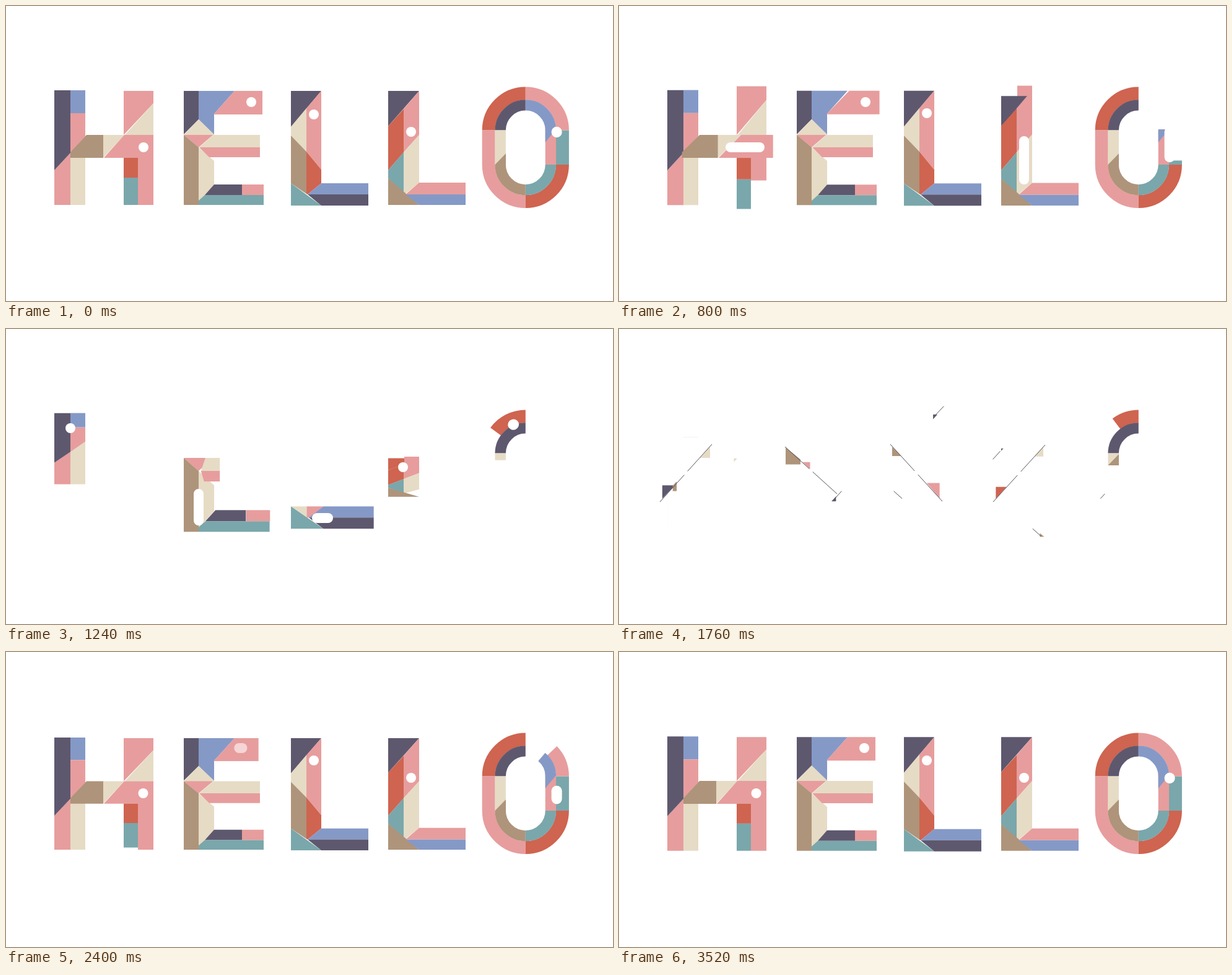
Write an HTML page with a canvas that moves like this. It is 980 by 476 pixels and loops after 3.56 s.

```html
<!DOCTYPE html>
<html lang="en">
<head>
<meta charset="utf-8">
<title>Hello</title>
<style>
html, body { margin: 0; width: 100%; height: 100%; overflow: hidden; background: #fff; }
canvas { display: block; }
</style>
</head>
<body>
<canvas id="stage" width="980" height="476"></canvas>
<script>
const ctx = document.getElementById('stage').getContext('2d');
const LOOP = 3560, SWITCH = 1500;
const C = {
  purple: '#5e586e', blue: '#8599c7', pink: '#e79d9d', cream: '#e6dbc5',
  brown: '#ae947a', red: '#cf6450', teal: '#7aa7ab'
};

const clamp = v => Math.max(0, Math.min(1, v));
const span = (t, a, b) => clamp((t - a) / (b - a));
const easeInOut = p => p < .5 ? 2 * p * p : 1 - 2 * (1 - p) * (1 - p);
const backIn = p => p * p * (2.7 * p - 1.7);

// Interpolates rows of [time, ...values].
function keyed(t, rows) {
  if (t <= rows[0][0]) return rows[0].slice(1);
  for (let i = 1; i < rows.length; i++) {
    const a = rows[i - 1], b = rows[i];
    if (t <= b[0]) {
      const p = span(t, a[0], b[0]);
      return a.slice(1).map((v, j) => v + (b[j + 1] - v) * p);
    }
  }
  return rows[rows.length - 1].slice(1);
}

// enter: "side start end dx dy" - reveal direction, window and starting offset
// leave: "axis value start end" - squash onto a line
function piece(color, shape, enter, leave, since = 0) {
  const points = shape.split(' ').map(p => p.split(',').map(Number));
  const xs = points.map(p => p[0]), ys = points.map(p => p[1]);
  const box = [Math.min(...xs), Math.min(...ys), Math.max(...xs), Math.max(...ys)];
  return { color: C[color], points, box, enter: enter && parse(enter), leave: leave && parse(leave), since };
}
function parse(spec) {
  const [kind, ...n] = spec.split(' ');
  return [kind, ...n.map(Number)];
}

const letters = [
  { leave: parse('y 136 1060 1276'), pieces: [
    piece('pink', '78,265 104,237 104,321 78,321', 'r 1750 2050'),
    piece('cream', '104,237 128,208 128,321 104,321', 'd 1640 2050 23 -24'),
    piece('purple', '78,136 104,136 104,237 78,265', 'u 1640 2050 -10 12'),
    piece('blue', '104,136 128,136 128,173 104,173', 'u 1750 2050'),
    piece('pink', '104,173 128,173 128,210 104,237', 'u 1780 2060'),
    piece('brown', '130,208 157,208 157,245 104,245 104,236', 'r 1660 2060 -20 20', 'x 128 640 1060'),
    piece('cream', '157,208 191,208 157,245', 'l 1640 2060', 'x 128 640 1060'),
    piece('pink', '190,137 238,137 238,157 190,208', 'r 1930 2160', 'y 208 660 980'),
    piece('cream', '238,157 238,208 192,208', 'l 2130 2340', 'y 208 660 980'),
    piece('pink', '191,208 238,208 238,245 158,245', 'r 1860 2100', 'x 128 640 1060'),
    piece('pink', '213,244 238,244 238,321 213,321', 'd 2140 2400', 'y 244 600 828'),
    piece('red', '190,245 213,245 213,277 190,277', 'l 2040 2280', 'y 245 740 940'),
    piece('teal', '190,277 213,277 213,321 190,321', 'd 2200 2450', 'y 245 740 940')
  ] },
  { leave: parse('y 208 1180 1460'), pieces: [
    piece('purple', '287,137 311,137 311,183 287,207', 'u 2160 2400', 'y 208 820 1140'),
    piece('blue', '311,137 369,137 336,174 336,208 311,183', 'u 1980 2240', 'y 208 820 1140'),
    piece('pink', '369,137 414,137 414,175 335,175', 'r 2200 2450', 'x 336 680 1060'),
    piece('cream', '311,183 336,207 311,228 287,208', 'u 1860 2080', 'y 208 860 1160'),
    piece('pink', '287,208 334,208 311,228', 'd 2140 2300'),
    piece('cream', '335,208 410,208 410,228 312,228', 'r 1860 2080', 'x 316 860 1270'),
    piece('brown', '287,208 311,228 311,321 287,321', 'd 1640 1980 -24 -24'),
    piece('cream', '311,228 336,250 336,289 311,316', 'd 1800 2040'),
    piece('pink', '312,228 410,228 410,244 328,244', 'r 1660 2060 -18 -16', 'x 316 860 1270'),
    piece('purple', '336,288 381,288 381,305 321,305', 'r 1660 2060 25 -29', 'x 312 1140 1430'),
    piece('pink', '381,288 416,288 416,305 381,305', 'r 1960 2120', 'x 312 1080 1440'),
    piece('teal', '321,305 416,305 416,321 311,321 311,314', 'r 1960 2220', 'x 311 1060 1430')
  ] },
  { leave: parse('x 460 1160 1460'), pieces: [
    piece('cream', '460,286 485,286 485,304', '', '', 860),
    piece('pink', '484,286 509,286 488,304 484,304', '', '', 860),
    piece('purple', '460,137 509,137 460,195', 'l 1650 2060 6 -2', 'y 286 800 1180'),
    piece('pink', '509,137 509,264 485,235 485,165', 'u 1640 2020 11 13', 'y 286 800 1180'),
    piece('cream', '485,165 485,235 460,209 460,195', 'u 1800 2060', 'y 286 800 1180'),
    piece('brown', '460,209 485,235 485,303 460,286', 'd 1640 2060 -23 -24', 'y 286 800 1180'),
    piece('red', '485,235 509,264 509,286 487,304 485,303', 'l 1920 2160', 'y 286 800 1180'),
    piece('teal', '460,286 509,322 460,322', 'u 1820 2080'),
    piece('blue', '509,286 585,286 585,304 487,304', 'd 2100 2300'),
    piece('purple', '487,304 585,304 585,322 509,322', 'r 1900 2180')
  ] },
  { leave: parse('y 245 760 1282'), pieces: [
    piece('pink', '643,130 667,130 667,165 643,165', '', '', 720),
    piece('red', '617,137 643,137 643,166 617,194', '', '', 960),
    piece('purple', '617,137 667,137 617,194', 'u 1690 2060 0 2', 'y 194 600 870'),
    piece('red', '643,165 643,235 617,265 617,194', 'u 1640 2020 -11 13'),
    piece('pink', '667,137 667,208 642,236 642,166', 'u 1800 2060'),
    piece('cream', '667,208 667,285 645,303 642,302 642,236', 'd 1640 2050 22 -23'),
    piece('teal', '617,265 642,236 642,302 617,278', 'r 2080 2260'),
    piece('brown', '617,278 667,321 617,321', 'l 1650 2060 23 20'),
    piece('pink', '667,285 742,285 742,304 645,304', 'r 1960 2260', 'x 642 800 1140'),
    piece('blue', '645,304 742,304 742,321 667,321', 'r 2160 2400', 'x 642 800 1140')
  ] }
];

function squash(points, spec, t) {
  if (!spec) return points;
  const [axis, value, a, b] = spec;
  const k = 1 - backIn(span(t, a, b));
  return points.map(([x, y]) => axis === 'x' ? [value + (x - value) * k, y] : [x, value + (y - value) * k]);
}

function fillPoly(points, color) {
  ctx.beginPath();
  points.forEach(([x, y]) => ctx.lineTo(x, y));
  ctx.closePath();
  ctx.fillStyle = color;
  ctx.fill();
}

function drawPiece(p, letter, t) {
  if (t < SWITCH) {
    if (t >= p.since) fillPoly(squash(squash(p.points, p.leave, t), letter.leave, t), p.color);
    return;
  }
  if (!p.enter) return;
  const [side, a, b, dx = 0, dy = 0] = p.enter;
  const e = easeInOut(span(t, a, b));
  if (e === 0) return;
  ctx.save();
  ctx.translate(dx * (1 - e), dy * (1 - e));
  if (e < 1) {
    const [x0, y0, x1, y1] = p.box, w = x1 - x0, h = y1 - y0;
    ctx.beginPath();
    if (side === 'r') ctx.rect(x0, y0, w * e, h);
    if (side === 'l') ctx.rect(x1 - w * e, y0, w * e, h);
    if (side === 'd') ctx.rect(x0, y0, w, h * e);
    if (side === 'u') ctx.rect(x0, y1 - h * e, w, h * e);
    ctx.clip();
  }
  fillPoly(p.points, p.color);
  ctx.restore();
}

// The O is a track of six sections, counted counterclockwise from the top.
const OX = 838.8, TOP = 200.5, BOTTOM = 256, Q = Math.PI / 2;

function track(r, from, to, width, color, cap = 'butt') {
  if (to <= from) return;
  ctx.beginPath();
  for (let k = Math.floor(from); k < to && k < 6; k++) {
    const a = Math.max(0, from - k), b = Math.min(1, to - k);
    if (k === 1 || k === 4) {
      const x = OX + (k === 1 ? -r : r);
      const y = s => k === 1 ? TOP + (BOTTOM - TOP) * s : BOTTOM - (BOTTOM - TOP) * s;
      ctx.lineTo(x, y(a));
      ctx.lineTo(x, y(b));
    } else {
      const start = [-1, 0, 2, 1, 0, 0][k] * Q;
      ctx.arc(OX, k === 2 || k === 3 ? BOTTOM : TOP, r, start - a * Q, start - b * Q, true);
    }
  }
  ctx.lineWidth = width;
  ctx.lineCap = cap;
  ctx.strokeStyle = color;
  ctx.stroke();
}

const outerColors = ['red', 'pink', 'pink', 'red', 'teal', 'pink'];
const innerColors = ['purple', 'cream', 'brown', 'teal', 'pink', 'blue'];

function drawO(t) {
  const leaving = t < SWITCH;
  const [outer, inner] = leaving
    ? keyed(t, [[620, 6, 6], [780, 4.3, 5.1], [800, 4.12, 5], [1240, .6, 1.2], [1390, 0, 0]])
    : keyed(t, [[1640, 0, 0], [1760, .41, 1.35], [2120, 3.69, 4], [2480, 6, 6]]);
  for (let k = 0; k < 6; k++) {
    track(59.6, k, Math.min(k + 1, outer), 21, C[outerColors[k]]);
    track(40.6, k, Math.min(k + 1, inner), 17.4, C[innerColors[k]]);
  }
  if (inner > 1.32) {
    const y = TOP + (BOTTOM - TOP) * Math.min(1, inner - 1);
    fillPoly([[789.5, y], [807, y - 18], [807, y]], C.brown);
  }
  if (inner >= 5) fillPoly([[870.7, 199], [888, 199], [870.7, 220]], C.blue);

  if (leaving) {
    const [a, b] = keyed(t, [[620, 4.94, 4.95], [800, 4.22, 4.95], [1000, 2.2, 3], [1240, .25, .26], [1380, 0, .01]]);
    track(50.3, a, b, 17, '#fff', 'round');
  } else if (t > 2040) {
    const [a, b, alpha] = keyed(t, [[2040, 1.9, 1.95, 0], [2120, 2.52, 2.65, .6], [2300, 3.6, 4.1, 1], [2480, 4.94, 4.95, 1]]);
    ctx.globalAlpha = alpha;
    track(50.3, a, b, 17, '#fff', 'round');
    ctx.globalAlpha = 1;
  }
}

// Eyes: rows are [time, x1, y1, x2, y2] and, when entering, opacity.
const eyes = [
  {
    leave: [[640, 222, 228, 222, 228], [800, 180, 228, 227, 228], [940, 104, 228, 140, 228], [1060, 104, 190, 104, 215], [1240, 104, 160, 104, 160]],
    enter: [[2040, 163, 228, 165, 228, 0], [2120, 179, 228, 206, 228, .65], [2240, 221.5, 228, 221.5, 228, 1]]
  }, {
    leave: [[640, 396, 155, 396, 155], [800, 398, 155, 398, 155], [980, 322, 155, 360, 155], [1100, 311, 190, 311, 215], [1240, 311, 266, 311, 309], [1380, 330, 313, 360, 313]],
    enter: [[2320, 350, 155, 362, 155, 0], [2460, 396, 155, 396, 155, 1]]
  }, {
    leave: [[640, 497, 175, 497, 175], [800, 497, 173, 497, 173], [1000, 497, 200, 497, 240], [1140, 497, 290, 497, 305], [1240, 502, 305, 520, 305], [1380, 540, 305, 570, 305]],
    enter: [[2020, 497, 214, 497, 232, 0], [2120, 497, 178, 497, 184, 1], [2170, 497, 175, 497, 175, 1]]
  }, {
    leave: [[620, 654, 203, 654, 203], [800, 654, 218, 654, 280], [960, 654, 270, 654, 290], [1240, 641, 223, 641, 223]],
    enter: [[2180, 654, 260, 654, 280, 0], [2340, 654, 203, 654, 203, 1]]
  }
];

function drawEye(eye, t) {
  const [x1, y1, x2, y2, alpha = 1] = keyed(t, t < SWITCH ? eye.leave : eye.enter);
  if (t < SWITCH && t > 1400) return;
  ctx.globalAlpha = alpha;
  ctx.strokeStyle = '#fff';
  ctx.lineWidth = 16;
  ctx.lineCap = 'round';
  ctx.beginPath();
  ctx.moveTo(x1, y1);
  ctx.lineTo(x2 + .01, y2);
  ctx.stroke();
  ctx.globalAlpha = 1;
}

// Hairlines: [x0, y0, x1, y1, start, duration]
const splits = [
  [66, 279, 150, 186, 1560, 600],
  [268, 190, 352, 266, 1560, 600],
  [438, 186, 522, 278, 1560, 600],
  [604, 279, 688, 187, 1560, 600],
  [138, 267, 246, 148, 1780, 400],
  [291, 162, 339, 213, 2040, 300]
];
const dashes = [
  [360, 261, 286, 342, 1720, 440],
  [525, 124, 448, 205, 1720, 440],
  [443, 261, 524, 334, 1720, 440],
  [603, 211, 676, 130, 1720, 440],
  [682, 335, 600, 261, 1720, 440],
  [777, 274, 819, 228, 1720, 440],
  [858, 233, 913, 170, 2440, 480]
];

function hairline([x0, y0, x1, y1], a, b) {
  ctx.beginPath();
  ctx.moveTo(x0 + (x1 - x0) * a, y0 + (y1 - y0) * a);
  ctx.lineTo(x0 + (x1 - x0) * b, y0 + (y1 - y0) * b);
  ctx.stroke();
}

function drawHairlines(t) {
  ctx.strokeStyle = '#55525f';
  ctx.lineWidth = 1;
  ctx.lineCap = 'butt';
  for (const line of splits) {
    const p = (t - line[4]) / line[5];
    if (p <= 0 || p >= 1) continue;
    const near = p ** 2.5 / 2, far = Math.min(1, p * 3) / 2;
    hairline(line, .5 - far, .5 - near);
    hairline(line, .5 + near, .5 + far);
  }
  for (const line of dashes) {
    const p = (t - line[4]) / line[5];
    if (p > 0 && p < 1) hairline(line, p * p, 1 - (1 - p) ** 2);
  }
}

function draw(t) {
  ctx.fillStyle = '#fff';
  ctx.fillRect(0, 0, 980, 476);
  const [stretch] = t < SWITCH
    ? keyed(t, [[0, 1], [800, 1.004]])
    : keyed(t, [[2120, .975], [2880, .985], [3560, .998]]);
  ctx.save();
  ctx.translate(0, 229);
  ctx.scale(1, stretch);
  ctx.translate(0, -229);
  for (const letter of letters) for (const p of letter.pieces) drawPiece(p, letter, t);
  ctx.restore();
  drawO(t);
  eyes.forEach(eye => drawEye(eye, t));
  drawHairlines(t);
}

const begin = performance.now();
function tick() {
  const t = (performance.now() - begin) % LOOP;
  draw(Math.floor(t / 40) * 40);
  requestAnimationFrame(tick);
}
tick();
</script>
</body>
</html>
```
